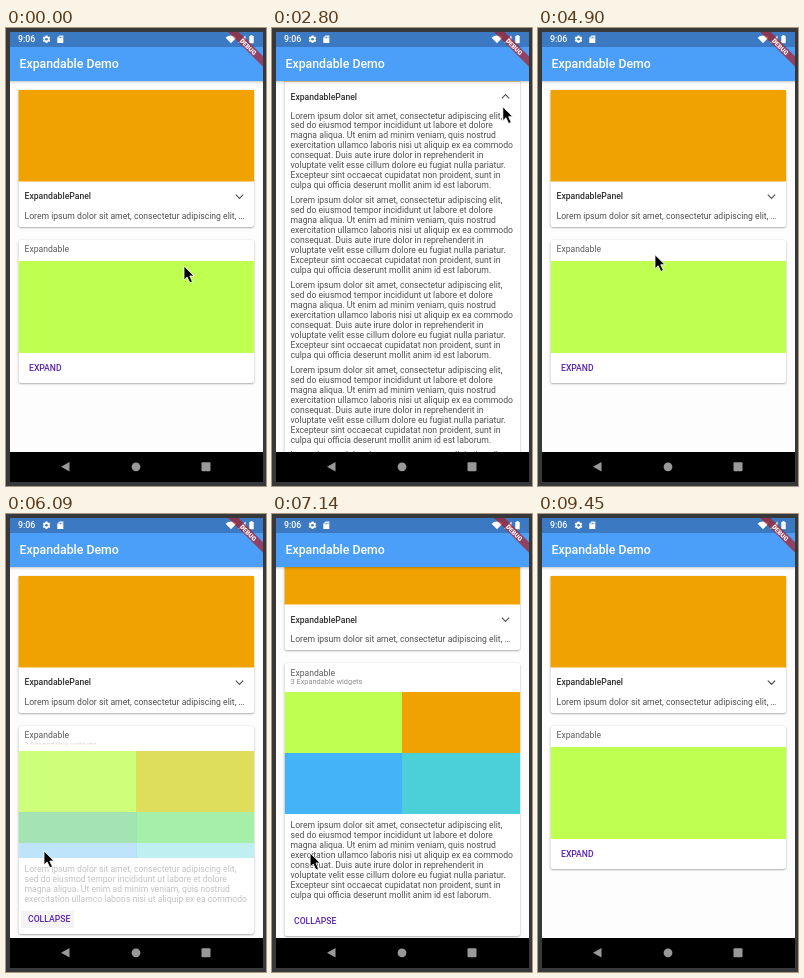
An HTML page with a canvas that plays this animation: 260x458 px, repeating every 9.52 s.

```html
<!DOCTYPE html>
<html lang="en">
<head>
<meta charset="utf-8">
<title>Expandable Demo</title>
<style>
html, body { margin: 0; width: 100%; height: 100%; overflow: hidden; background: #363839; }
canvas { display: block; width: 260px; height: 458px; }
</style>
</head>
<body>
<canvas></canvas>
<script>
const LOOP = 9520, STEP = 70;
const LIME = '#bfff50', ORANGE = '#f0a202', BLUE = '#45b3f7', CYAN = '#4bd0da';
const LOREM = [
  'Lorem ipsum dolor sit amet, consectetur adipiscing elit,',
  'sed do eiusmod tempor incididunt ut labore et dolore',
  'magna aliqua. Ut enim ad minim veniam, quis nostrud',
  'exercitation ullamco laboris nisi ut aliquip ex ea commodo',
  'consequat. Duis aute irure dolor in reprehenderit in',
  'voluptate velit esse cillum dolore eu fugiat nulla pariatur.',
  'Excepteur sint occaecat cupidatat non proident, sunt in',
  'culpa qui officia deserunt mollit anim id est laborum.'
];
const LINE = 9.95, PARAGRAPH = 84.8, PANEL_GROWTH = 415;

// Pointer stops: time, x, y
const POINTER = [
  [0, 178, 238], [560, 228.5, 172], [700, 229, 170],
  [2170, 229, 170], [2940, 231, 70], [3080, 231, 69],
  [4340, 231, 69], [5320, 43, 329], [5670, 38, 337],
  [7070, 38, 337], [7770, 42, 409], [7910, 42, 410],
  [9100, 42, 410], [9450, 58, 470]
];

const canvas = document.querySelector('canvas');
const ctx = canvas.getContext('2d');
const ratio = window.devicePixelRatio || 1;
canvas.width = 260 * ratio;
canvas.height = 458 * ratio;

const clamp = v => Math.min(1, Math.max(0, v));
const progress = (t, start, length) => clamp((t - start) / length);

function bezier(x1, y1, x2, y2) {
  const at = (a, b, u) => 3 * a * u * (1 - u) ** 2 + 3 * b * u * u * (1 - u) + u ** 3;
  return x => {
    let lo = 0, hi = 1;
    for (let i = 0; i < 20; i++) {
      const mid = (lo + hi) / 2;
      if (at(x1, x2, mid) < x) lo = mid; else hi = mid;
    }
    return at(y1, y2, (lo + hi) / 2);
  };
}
const ease = bezier(.25, .1, .25, 1);
const fastOutSlowIn = bezier(.4, 0, .2, 1);

// Overdamped spring that pulls an overscrolled list back
function spring(t, start) {
  const s = Math.max(0, t - start) / 1000;
  return 1.7 * Math.exp(-9.08 * s) - .7 * Math.exp(-22 * s);
}
const scrollAt = t =>
  t < 5000 ? 100 * ease(progress(t, 1468, 300)) * spring(t, 3510)
           : 63 * ease(progress(t, 6285, 300)) * spring(t, 8318);

const openness = (t, open, close) => progress(t, open, 300) - progress(t, close, 300);

function rect(x, y, w, h, fill) {
  ctx.fillStyle = fill;
  ctx.fillRect(x, y, w, h);
}

function poly(points, fill) {
  ctx.beginPath();
  points.forEach(p => ctx.lineTo(...p));
  ctx.closePath();
  ctx.fillStyle = fill;
  ctx.fill();
}

function disc(x, y, r, fill) {
  ctx.beginPath();
  ctx.arc(x, y, r, 0, 7);
  ctx.fillStyle = fill;
  ctx.fill();
}

function text(str, x, y, fill, size = 8.63, weight = 400) {
  ctx.font = `${weight} ${size}px Roboto, sans-serif`;
  ctx.fillStyle = fill;
  ctx.fillText(str, x, y);
}

function group(draw, alpha = 1) {
  ctx.save();
  ctx.globalAlpha *= alpha;
  draw();
  ctx.restore();
}

function clipped(x, y, w, h, alpha, draw) {
  if (h <= 0 || alpha <= 0) return;
  group(() => {
    ctx.beginPath();
    ctx.rect(x, y, w, h);
    ctx.clip();
    draw();
  }, alpha);
}

function card(y, h) {
  group(() => {
    ctx.shadowColor = 'rgba(0,0,0,.38)';
    ctx.shadowBlur = 2 * ratio;
    ctx.shadowOffsetY = .8 * ratio;
    ctx.beginPath();
    ctx.roundRect(12.5, y, 235.5, h, 2.5);
    ctx.fillStyle = '#fff';
    ctx.fill();
  });
}

function paragraph(y) {
  LOREM.forEach((line, i) => text(line, 18.5, y + i * LINE, '#505050'));
}

function chevron(y, turn) {
  group(() => {
    ctx.translate(233.5, y);
    ctx.rotate(Math.PI * turn);
    ctx.beginPath();
    ctx.moveTo(-3.7, -1.9);
    ctx.lineTo(0, 1.8);
    ctx.lineTo(3.7, -1.9);
    ctx.lineWidth = 1.2;
    ctx.strokeStyle = '#555';
    ctx.stroke();
  });
}

// A press highlight that appears at once and fades
const highlight = (t, start, length) =>
  t < start ? 0 : .07 * (1 - progress(t, start, length));

function panelCard(t, fade, size) {
  const grow = size * PANEL_GROWTH;
  card(62, 137 + grow);
  rect(12.5, 62, 235.5, 91.5, ORANGE);
  rect(13, 155, 235, 25, `rgba(0,0,0,${highlight(t, 1050, 400)})`);
  text('ExpandablePanel', 18.5, 171.5, '#303030', 8.63, 500);
  chevron(168.5, fade);
  clipped(13, 178, 235, 21 + grow, 1 - fade, () => text(LOREM[0] + ' …', 18.5, 191, '#505050'));
  clipped(13, 178, 235, 21 + grow, fade, () => {
    for (let i = 0; i < 5; i++) paragraph(190.5 + i * PARAGRAPH);
  });
}

function galleryCard(t, fade, size) {
  const top = 233 + 8 * size, mid = top + 92 + 30 * size;
  const bottom = mid + 92 * size;
  card(212, bottom + 30 - 212);
  text('Expandable', 18.5, 224.5, '#5c5c5c');
  clipped(13, 226, 235, 9 * size, fade, () =>
    text('3 Expandable widgets', 18.5, 233, '#8c8c8c', 7.4));
  clipped(12.5, top, 235.5, mid - top, 1 - fade, () => rect(12.5, top, 235.5, 92, LIME));
  clipped(12.5, top, 235.5, mid - top, fade, () =>
    [LIME, ORANGE, BLUE, CYAN].forEach((c, i) =>
      rect(12.5 + i % 2 * 117.5, top + (i >> 1) * 61, 118, 61, c)));
  clipped(13, mid, 235, bottom - mid, fade, () => paragraph(mid + 14));
  const opened = t >= 5985 && t < 8060;
  const press = highlight(t, 5810, 750) + highlight(t, 7910, 400);
  rect(15, bottom + 7, 53, 17, `rgba(0,0,0,${press})`);
  text(opened ? 'COLLAPSE' : 'EXPAND', opened ? 22 : 23, bottom + 18.3, '#5a22b0', 8.63, 500);
}

function statusIcons() {
  text('9:06', 12, 14.3, '#fff', 8.8, 500);
  group(() => {
    ctx.translate(40.5, 11.2);
    for (let i = 0; i < 6; i++) {
      ctx.rotate(Math.PI / 3);
      rect(-1, -3.8, 2, 3.8, '#fff');
    }
    disc(0, 0, 2.9, '#fff');
    disc(0, 0, 1.3, '#3b79c3');
  });
  poly([[53.5, 7.5], [57.3, 7.5], [57.3, 15], [51.3, 15], [51.3, 9.7]], '#fff');
  [53, 54.5, 56].forEach(x => rect(x - .3, 8.6, .7, 1.7, '#3b79c3'));

  ctx.beginPath();
  ctx.moveTo(225, 15.2);
  ctx.arc(225, 15.2, 7.6, -Math.PI * .75, -Math.PI * .25);
  ctx.fillStyle = '#fff';
  ctx.fill();
  poly([[232, 15], [239.5, 15], [239.5, 7.5]], '#fff');
  rect(243.3, 8, 4.4, 7.2, '#fff');
  rect(244.5, 7, 2, 1.2, '#fff');
}

function banner() {
  clipped(4, 4, 253, 420, 1, () => {
    ctx.translate(257, 4);
    ctx.rotate(Math.PI / 4);
    rect(-26, 17.2, 52, 7.4, 'rgba(172,28,38,.7)');
    ctx.textAlign = 'center';
    text('DEBUG', 0, 23.2, '#fff', 6.3, 900);
  });
}

function chrome() {
  rect(4, 53, 253, 1, 'rgba(0,0,0,.16)');
  rect(4, 54, 253, 1.5, 'rgba(0,0,0,.07)');
  rect(4, 4, 253, 49, '#4c9ff8');
  rect(4, 4, 253, 15, '#3b79c3');
  text('Expandable Demo', 13.5, 40.2, '#fff', 12.3, 500);
  statusIcons();
  banner();
  rect(4, 424, 253, 30, '#000');
  poly([[55, 438.8], [63.5, 434], [63.5, 443.6]], '#999');
  disc(130, 438.8, 4.4, '#999');
  ctx.beginPath();
  ctx.roundRect(195.5, 434.3, 9, 9, 1);
  ctx.fill();
}

function pointer(t) {
  const next = POINTER.findIndex(p => p[0] > t);
  if (next < 0) return;
  const [t0, x0, y0] = POINTER[next - 1], [t1, x1, y1] = POINTER[next];
  const u = progress(t, t0, t1 - t0), k = u * u * (3 - 2 * u);
  group(() => {
    ctx.translate(x0 + (x1 - x0) * k, y0 + (y1 - y0) * k);
    poly([[0, 0], [0, 14], [3.2, 11], [5.8, 16.8], [8.4, 15.7], [5.8, 10], [10, 10]], '#000');
    ctx.lineWidth = .8;
    ctx.strokeStyle = '#fff';
    ctx.stroke();
  });
}

function draw(t) {
  ctx.setTransform(ratio, 0, 0, ratio, 0, 0);
  rect(0, 0, 260, 458, '#363839');
  rect(4, 53, 253, 371, '#fdfdfd');
  const panel = openness(t, 1168, 3300), gallery = openness(t, 5985, 8060);
  const panelSize = fastOutSlowIn(panel);
  clipped(4, 53, 253, 371, 1, () => {
    ctx.translate(0, -scrollAt(t));
    panelCard(t, panel, panelSize);
    ctx.translate(0, panelSize * PANEL_GROWTH);
    galleryCard(t, gallery, fastOutSlowIn(gallery));
  });
  chrome();
  pointer(t);
}

const began = performance.now();
function tick() {
  const t = (performance.now() - began) % LOOP;
  draw(Math.floor(t / STEP) * STEP);
  requestAnimationFrame(tick);
}
tick();
</script>
</body>
</html>
```
